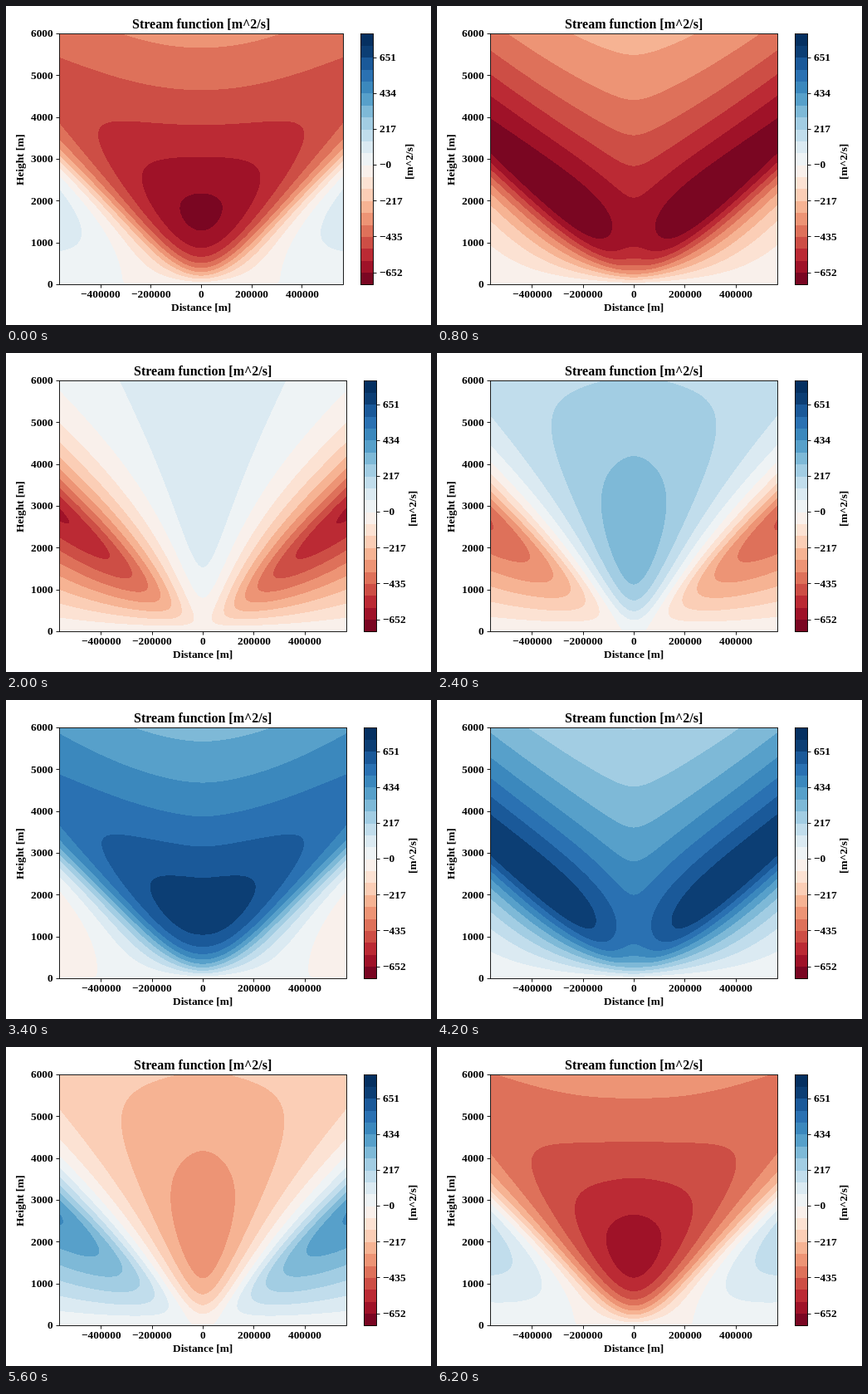
Animation, 512 px wide and 384 px high, one loop 6400 ms. Source, as an HTML page with a canvas:

```html
<!DOCTYPE html>
<html lang="en">
<head>
<meta charset="utf-8">
<title>Stream function</title>
<style>
  html, body { margin: 0; width: 100%; height: 100%; overflow: hidden; background: #fff; }
  canvas { display: block; }
</style>
</head>
<body>
<canvas id="stage" width="512" height="384"></canvas>
<script>
const start = performance.now();
const ctx = document.getElementById('stage').getContext('2d');

const LEFT = 64.5, TOP = 33.5, HEIGHT = 302, BOTTOM = TOP + HEIGHT;
const FRAMES = 32, FRAME_MS = 200;
const AMP = 1236.5;                      // m^2/s
const COAST = 0.2;                       // scaled width of the coast
const PHASE = Math.PI - 0.006, PHASE_STEP = 2 * Math.PI / FRAMES;
const LEVEL = 72.36, SHIFT = 0.4, BANDS = 21;

// Red-to-blue scale, one flat colour per band
const stops = [
  [103, 0, 31], [178, 24, 43], [214, 96, 77], [244, 165, 130], [253, 219, 199], [247, 247, 247],
  [209, 229, 240], [146, 197, 222], [67, 147, 195], [33, 102, 172], [5, 48, 97]
];
const bands = Array.from({ length: BANDS }, (_, i) => {
  const p = Math.min((i + 0.5) / 2, 10), n = Math.min(Math.floor(p), 9);
  return stops[n].map((c, j) => Math.round(c + (stops[n + 1][j] - c) * (p - n)));
});

// F(s) = integral of exp(iks - COAST k) / (1 + k^2) over k > 0, tabulated
const DS = 0.01, DK = 0.02;
const tableRe = [], tableIm = [];
for (let n = 0; n <= 602; n++) {
  let re = 0, im = 0;
  for (let k = DK / 2; k < 40; k += DK) {
    const weight = Math.exp(-COAST * k) / (1 + k * k) * DK;
    re += weight * Math.cos(k * n * DS);
    im += weight * Math.sin(k * n * DS);
  }
  tableRe.push(re);
  tableIm.push(im);
}
function lookup(table, s) {
  const p = s / DS, n = Math.floor(p);
  return table[n] + (table[n + 1] - table[n]) * (p - n);
}
const realF = s => lookup(tableRe, Math.abs(s));
const imagF = s => Math.sign(s) * lookup(tableIm, Math.abs(s));

// A layout holds the two phase components of the flow at each pixel
function makeLayout(width) {
  const w = width - 1, h = HEIGHT - 1;
  const sin = new Float32Array(w * h), cos = new Float32Array(w * h);
  for (let j = 0, n = 0; j < h; j++) {
    const z = 4 * (h - j) / HEIGHT, decay = Math.exp(-z);
    for (let i = 0; i < w; i++, n++) {
      const x = 4 * (i + 1.4) / width - 2;
      sin[n] = (realF(z + x) + realF(z - x)) / 2 - decay * realF(x);
      cos[n] = (imagF(z + x) + imagF(z - x)) / 2;
    }
  }
  return { width, sin, cos, image: new ImageData(w, h) };
}

function drawField({ sin, cos, image }, phase) {
  const s = AMP * Math.sin(phase), c = AMP * Math.cos(phase), out = image.data;
  for (let n = 0; n < sin.length; n++) {
    const level = Math.floor((s * sin[n] + c * cos[n] + SHIFT) / LEVEL) + 10;
    const [r, g, b] = bands[Math.max(0, Math.min(BANDS - 1, level))];
    out[4 * n] = r;
    out[4 * n + 1] = g;
    out[4 * n + 2] = b;
    out[4 * n + 3] = 255;
  }
  ctx.putImageData(image, LEFT + 0.5, TOP + 0.5);
}

const snap = v => Math.floor(v) + 0.5;
const signed = v => String(v).replace('-', '\u2212');

// Text starts on a whole pixel; align is the share of its width left of x
function text(str, x, y, align = 0.5, size = 13.333) {
  ctx.font = `bold ${size}px "Liberation Serif", "Times New Roman", serif`;
  ctx.fillText(str, Math.round(x - align * ctx.measureText(str).width), Math.round(y));
}
function upright(str, x, y) {
  ctx.save();
  ctx.translate(Math.round(x), y);
  ctx.rotate(-Math.PI / 2);
  text(str, 0, 0);
  ctx.restore();
}
function tick(x, y, dx, dy) {
  ctx.beginPath();
  ctx.moveTo(x, y);
  ctx.lineTo(x + dx, y + dy);
  ctx.stroke();
}

function drawAxes(width) {
  const mid = LEFT + width / 2;
  ctx.strokeRect(LEFT, TOP, width, HEIGHT);
  for (let km = -400; km <= 400; km += 200) {
    const x = mid + km * width / 1127.8;
    tick(snap(x), BOTTOM, 0, 4);
    text(signed(km * 1000), x - 0.3, 351);
  }
  for (let z = 0; z <= 6000; z += 1000) {
    const y = BOTTOM - z / 6000 * HEIGHT;
    tick(LEFT, snap(y), -4, 0);
    text(z, LEFT - 7.6, y + 3.7, 1);
  }
  text('Stream function [m^2/s]', mid - 0.3, 27, 0.5, 16);
  text('Distance [m]', mid - 0.3, 367);
  upright('Height [m]', 21, 185);
}

function drawColorbar(x) {
  const edge = i => BOTTOM - i * HEIGHT / BANDS;
  bands.forEach((rgb, i) => {
    const top = Math.round(edge(i + 1));
    ctx.fillStyle = `rgb(${rgb})`;
    ctx.fillRect(x, top, 15, Math.round(edge(i)) - top);
  });
  ctx.fillStyle = '#000';
  ctx.strokeRect(x, TOP, 15, HEIGHT);
  ['-652', '-435', '-217', '-0', '217', '434', '651'].forEach((label, n) => {
    const y = edge(1 + 3 * n);
    tick(x + 15, snap(y), 4, 0);
    text(signed(label), x + 22.8, y + 3.7, 0);
  });
  upright('[m^2/s]', x + 62.5, 187);
}

// The first frame has a slightly narrower plot
const narrow = makeLayout(342), wide = makeLayout(346);
let shown = -1;

function render() {
  const frame = Math.floor((performance.now() - start) / FRAME_MS) % FRAMES;
  if (frame !== shown) {
    shown = frame;
    const layout = frame ? wide : narrow;
    ctx.fillStyle = '#fff';
    ctx.fillRect(0, 0, 512, 384);
    drawField(layout, PHASE + frame * PHASE_STEP);
    ctx.fillStyle = ctx.strokeStyle = '#000';
    ctx.lineWidth = 0.89;
    drawAxes(layout.width);
    drawColorbar(LEFT + layout.width + 21);
  }
  requestAnimationFrame(render);
}
render();
</script>
</body>
</html>
```
